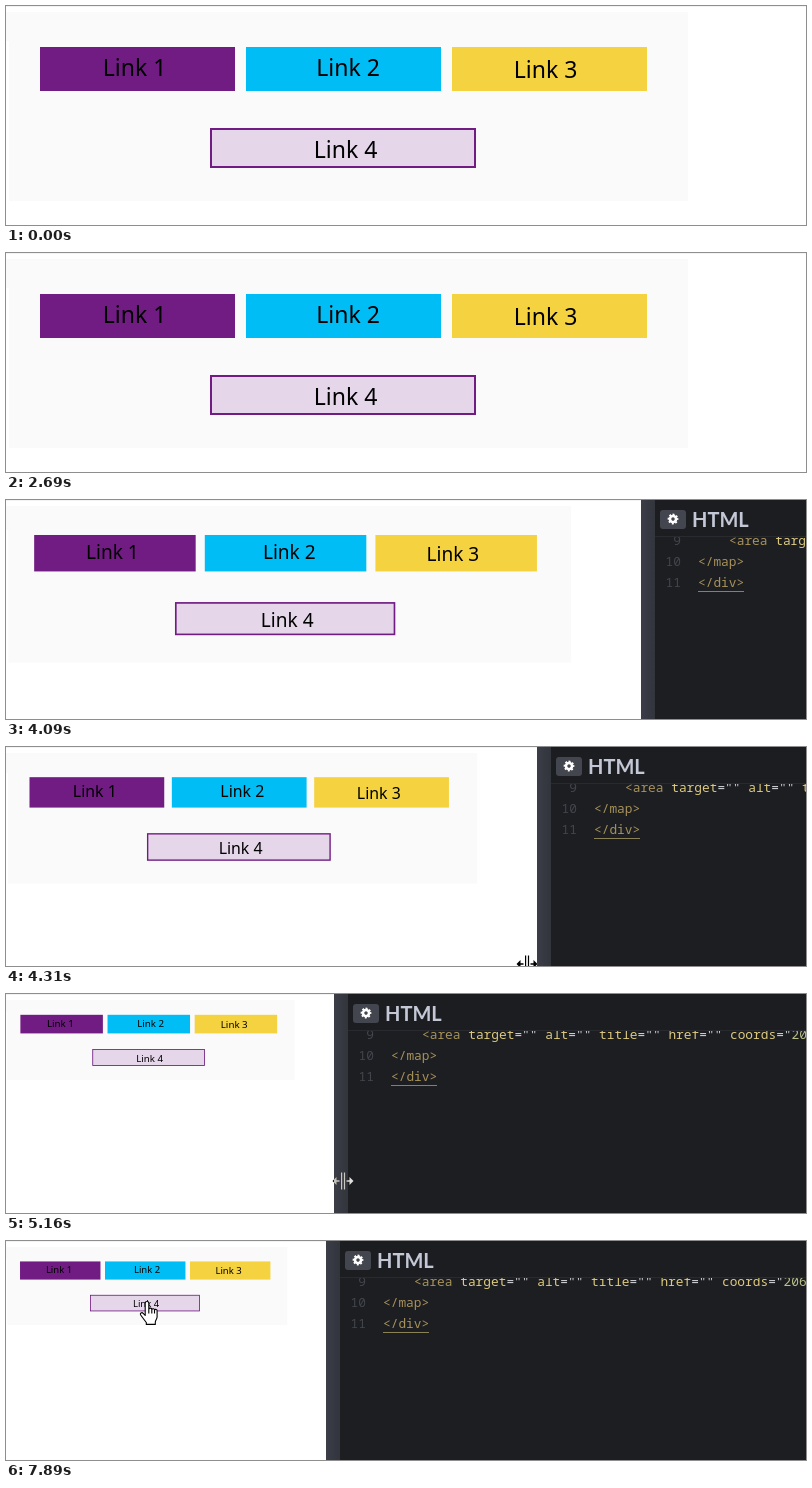
An HTML page for the animation above (8000 ms loop, 800 by 219 pixels).

```html
<!DOCTYPE html>
<html lang="en">
<head>
<meta charset="utf-8">
<title>Responsive image map</title>
<style>
  html, body { margin: 0; width: 100%; height: 100%; overflow: hidden; background: #fff; }
  svg { display: block; width: 800px; height: 219px; }
  .label { font: 23px "Noto Sans", "Open Sans", sans-serif; text-anchor: middle; }
  .title { font: bold 20px Lato, sans-serif; fill: #c4c8d6; }
  .code { font: 12.83px "Noto Sans Mono", "DejaVu Sans Mono", monospace; white-space: pre; }
  .num { fill: #43454d; text-anchor: end; }
  .tag { fill: #a7925a; }
  .attr { fill: #ddca7e; }
  .op { fill: #d5d7de; }
  .str { fill: #b9c08a; }
  .pointer { fill: #fff; stroke: #000; stroke-linejoin: round; }
  #resize { mix-blend-mode: difference; fill: #fff; }
</style>
</head>
<body>
<svg viewBox="0 0 800 219">
  <defs>
    <linearGradient id="bar">
      <stop offset="0" stop-color="#3b3d47"/>
      <stop offset="1" stop-color="#33353d"/>
    </linearGradient>
  </defs>
  <rect width="800" height="219" fill="#fff"/>
  <rect width="800" height="1" fill="#f3f3f3"/>

  <g id="map">
    <path d="M0 0H682V189H3V29H0Z" fill="#fafafa"/>
    <g id="links"></g>
  </g>

  <g id="panel">
    <rect x="14" width="800" height="219" fill="#1d1e22"/>
    <g class="code">
      <text class="num" x="40" y="45">9</text>
      <text class="num" x="40" y="66">10</text>
      <text class="num" x="40" y="87">11</text>
      <text id="area" x="88" y="45"></text>
      <text class="tag" x="57" y="66">&lt;/map&gt;</text>
      <text class="tag" x="57" y="87">&lt;/div&gt;</text>
    </g>
    <rect x="57" y="91" width="46" height="1" fill="#8b8056"/>
    <rect x="14" width="800" height="37" fill="#1c1d21"/>
    <rect x="14" y="36" width="800" height="1" fill="#292a2f"/>
    <rect width="14" height="219" fill="url(#bar)"/>
    <rect x="19" y="10" width="26" height="19" rx="3" fill="#44464f"/>
    <g transform="translate(32 19)" fill="none" stroke="#fff">
      <circle r="3" stroke-width="2.6"/>
      <circle r="4.5" stroke-width="1.8" stroke-dasharray="1.9 1.634" transform="rotate(-12)"/>
    </g>
    <text class="title" x="51" y="26.5">HTML</text>
  </g>

  <g id="arrow" class="pointer">
    <path d="M.5 .5V16.5L4.2 13L6.7 18.5L9 17.5L6.6 12.2H11.5Z"/>
  </g>
  <g id="hand" class="pointer">
    <path transform="translate(-7.3 0)" stroke-width="1.1" d="M5.5 14.5V2.3a1.8 1.8 0 0 1 3.6 0V8.5a1.5 1.5 0 0 1 3 .2a1.4 1.4 0 0 1 2.7 .7a1.3 1.3 0 0 1 2.6 .9V16c0 2-1.8 3.5-1.8 5.2V23.4H6.6V21.5C5 19.5 2.8 16.5 1 14C-.2 12 2.2 11 3.5 12.3ZM9.1 8.5v4M12.1 8.9v3.6M14.8 9.6v3"/>
  </g>
  <g id="resize">
    <path d="M-2 -8.5h1.2v17h-1.2zM.9 -8.5h1.2v17h-1.2zM-10.5 0l4-4v3.3h3v1.4h-3v3.3zM10.5 0l-4-4v3.3h-3v1.4h3v3.3z"/>
  </g>
</svg>
<script>
const LOOP = 8000;
const $ = id => document.getElementById(id);

// Link boxes inside the map: x, y, width, height, fill, label centre, baseline
const links = [
  [34, 35, 195, 44, '#701c82', 128.5, 64],
  [240, 35, 195, 44, '#00bdf5', 342, 64],
  [446, 35, 195, 44, '#f5d240', 539.5, 66],
  [204, 116, 266, 40, '#e5d6ea', 339.5, 146]
];

$('links').innerHTML = links.map(([x, y, w, h, fill, cx, base], i) => {
  const box = i < 3
    ? `<rect x="${x}" y="${y}" width="${w}" height="${h}" fill="${fill}"/>`
    : `<rect x="${x + 1}" y="${y + 1}" width="${w - 2}" height="${h - 2}" fill="${fill}" stroke="#701c82" stroke-width="2"/>`;
  return `${box}<text class="label" x="${cx}" y="${base}">Link ${i + 1}</text>`;
}).join('');

const span = (cls, text) => `<tspan class="${cls}">${text}</tspan>`;
const attr = (name, value) => span('attr', ' ' + name) + span('op', '="') + value;
$('area').innerHTML = span('tag', '&lt;area') +
  ['target', 'alt', 'title', 'href'].map(n => attr(n, span('op', '"'))).join('') +
  attr('coords', span('str', '206'));

// Moves: start, end, number of steps, evenly spaced path points.
// A point is [x, y], or [x, y, split] while the divider is dragged.
const moves = [
  [670, 1130, 7, [[699, 206], [560, 165], [417, 142]]],
  [1300, 1440, 3, [[400, 125], [343, 71]]],
  [1590, 1760, 3, [[370, 71], [499, 68]]],
  [1910, 2690, 11, [[460, 62], [250, 42], [142, 52], [260, 130], [430, 146], [638, 242]]],
  [3850, 4620, 11, [[735, 240, 740], [664, 235, 670], [592, 228, 600],
                    [521, 217, 531], [473, 205, 478], [435, 196, 432]]],
  [4710, 5450, 11, [[427, 192, 420], [397, 189, 390], [358, 188, 352],
                    [337, 187, 328], [330, 190, 322], [328.5, 192, 320]]],
  [5530, 5620, 2, [[320, 178], [314, 163]]],
  [5850, 6240, 6, [[300, 135], [255, 50], [219, 12]]],
  [6400, 6460, 2, [[220, 20], [221, 24]]],
  [6810, 7030, 4, [[218, 22], [185, 20], [136, 18]]],
  [7260, 7260, 1, [[137, 26]]],
  [7660, 7890, 4, [[138, 35], [141, 60]]]
];

function along(points, u) {
  const p = u * (points.length - 1);
  const i = Math.min(Math.floor(p), points.length - 2);
  if (i < 0) return points[0];
  return points[i].map((v, k) => v + (points[i + 1][k] - v) * (p - i));
}

function stateAt(t) {
  let pos = [-100, -100], split = 820;
  for (const [start, end, n, points] of moves) {
    if (t < start) break;
    let u = 1;
    if (t < end) {
      // The small bias absorbs rounding of the step times.
      const step = Math.floor((t - start) / (end - start) * (n - 1) + 0.15);
      u = Math.min(step / (n - 1), 1);
    }
    pos = along(points, u);
    if (pos.length > 2) split = pos[2];
  }
  return { x: pos[0], y: pos[1], split, dragging: pos.length > 2 };
}

function draw(t) {
  const { x, y, split, dragging } = stateAt(t);
  const scale = Math.min(1, (split - 7.5) * 0.00132);
  $('map').setAttribute('transform', `translate(0 6) scale(${scale})`);
  $('panel').setAttribute('transform', `translate(${split} 0)`);

  const mx = x / scale, my = (y - 6) / scale;
  const over = links.some(([lx, ly, w, h]) => mx >= lx && mx <= lx + w && my >= ly && my <= ly + h);
  const active = dragging ? 'resize' : over ? 'hand' : 'arrow';
  for (const id of ['arrow', 'hand', 'resize']) {
    $(id).style.display = id === active ? '' : 'none';
  }
  $(active).setAttribute('transform', `translate(${x} ${y})`);
}

const begin = performance.now();
function tick() {
  draw((performance.now() - begin) % LOOP);
  requestAnimationFrame(tick);
}
tick();
</script>
</body>
</html>
```
